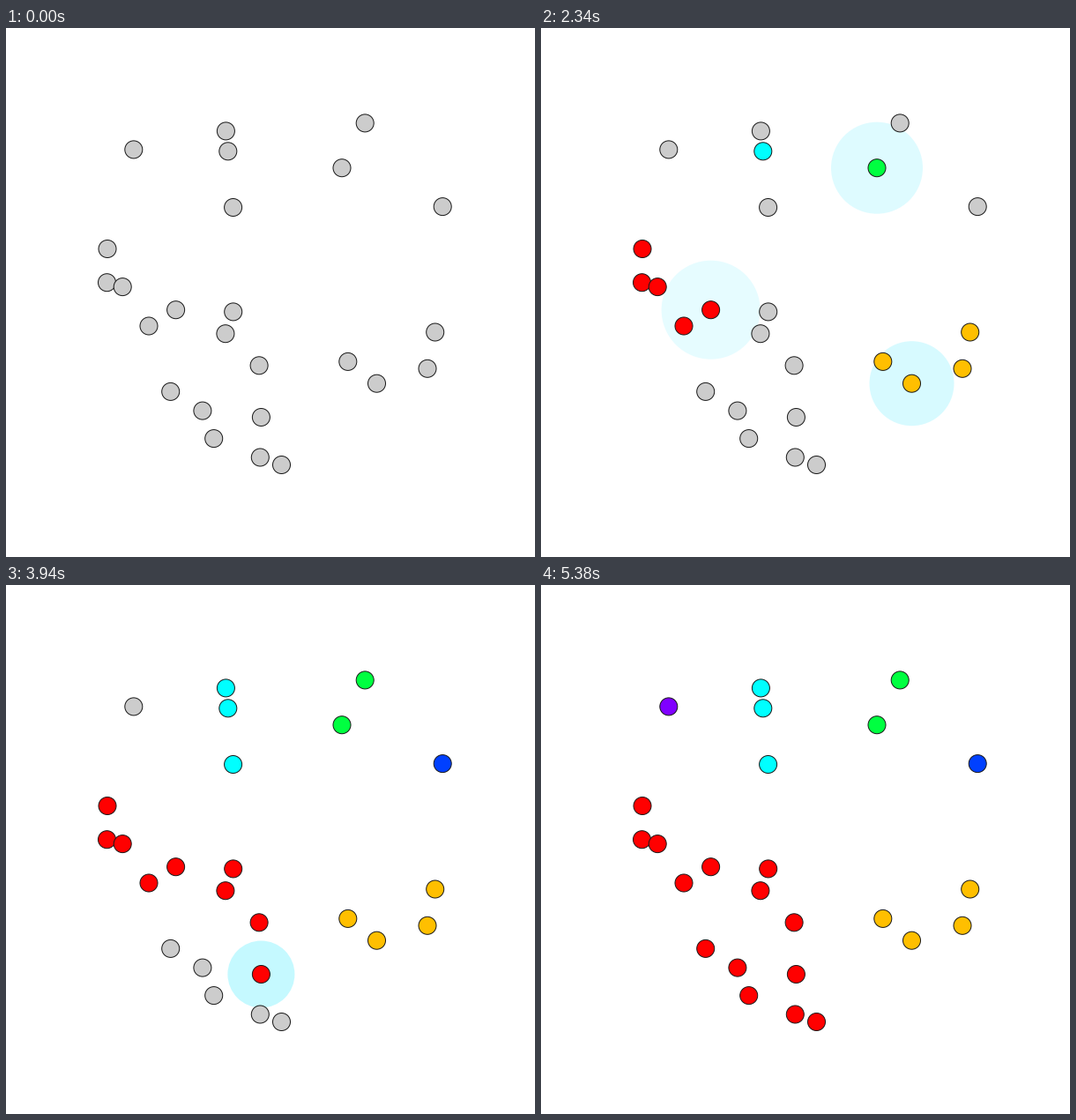
A matplotlib script that plays this animation: 600 px wide and 600 px high, repeating every 8 s.

```python
import math
from colorsys import hsv_to_rgb

import matplotlib.pyplot as plt
from matplotlib.animation import FuncAnimation
from matplotlib.patches import Circle

SIZE, DPI = 600, 100
FRAMES, INTERVAL = 400, 20
DOT_RADIUS = 10
REACH, GROWTH = 70, 2
VISIBLE_REACH = 62  # fainter rings blend into the white
GREY = "#cccccc"
RIPPLE = "#00e5ff"

# The first points are lit by hand, one at each seed frame; the rest catch on.
SEED_FRAMES = [33, 64, 92, 116, 194, 235]
POINTS = [
    (115, 250.5), (478, 386.3), (381, 158.7), (251.8, 139.8), (495.2, 202.6),
    (144.8, 137.9), (249.4, 116.9), (257.6, 203.5), (407.2, 107.9), (114.5, 288.7),
    (132.2, 293.6), (192.6, 319.7), (162, 338), (257.7, 321.9), (248.9, 346.7),
    (287.1, 382.8), (186.7, 412.4), (222.9, 434.1), (235.7, 465.6), (289.4, 441.5),
    (288.3, 487), (312.5, 495.5), (387.8, 378.4), (420.5, 403.2), (486.7, 345),
]


def seed_colour(order):
    """Eighths of the colour wheel, leaving out lime."""
    return hsv_to_rgb((order if order < 2 else order + 1) / 8, 1, 1)


def ripple_radius(frame, start):
    return GROWTH * (frame - start + 1)


def spread():
    """Let ripples light every grey point they reach.

    Returns {index: (frame lit, first ripple frame, colour)} in lighting order.
    """
    lit = {}
    for frame in range(FRAMES):
        if frame in SEED_FRAMES:
            seed = SEED_FRAMES.index(frame)
            lit[seed] = (frame, frame, seed_colour(seed))
        for source, (_, start, colour) in list(lit.items()):
            radius = ripple_radius(frame, start)
            if not 0 < radius < REACH:
                continue
            for index, point in enumerate(POINTS):
                if index not in lit and math.dist(POINTS[source], point) <= radius:
                    lit[index] = (frame, frame + 1, colour)
    return lit


LIT = spread()

fig = plt.figure(figsize=(SIZE / DPI, SIZE / DPI), dpi=DPI, facecolor="white")
ax = fig.add_axes([0, 0, 1, 1])
ax.set_xlim(0, SIZE)
ax.set_ylim(SIZE, 0)
ax.axis("off")

ripples = {
    index: ax.add_patch(Circle(POINTS[index], 1, fc=RIPPLE, lw=0, zorder=1, visible=False))
    for index in LIT
}
dots = [
    ax.add_patch(Circle(point, DOT_RADIUS, fc=GREY, ec="#1a1a1a", lw=72 / DPI, zorder=2))
    for point in POINTS
]


def draw(frame):
    for index, (lit_at, start, colour) in LIT.items():
        dots[index].set_facecolor(colour if frame >= lit_at else GREY)
        radius = ripple_radius(frame, start)
        visible = 0 < radius <= VISIBLE_REACH
        ripples[index].set_visible(visible)
        if visible:
            ripples[index].set_radius(radius)
            ripples[index].set_alpha(0.5 * (1 - radius / REACH))
    return [*ripples.values(), *dots]


animation = FuncAnimation(fig, draw, frames=FRAMES, interval=INTERVAL,
                          repeat=True, repeat_delay=0, blit=False)
plt.show()
```
